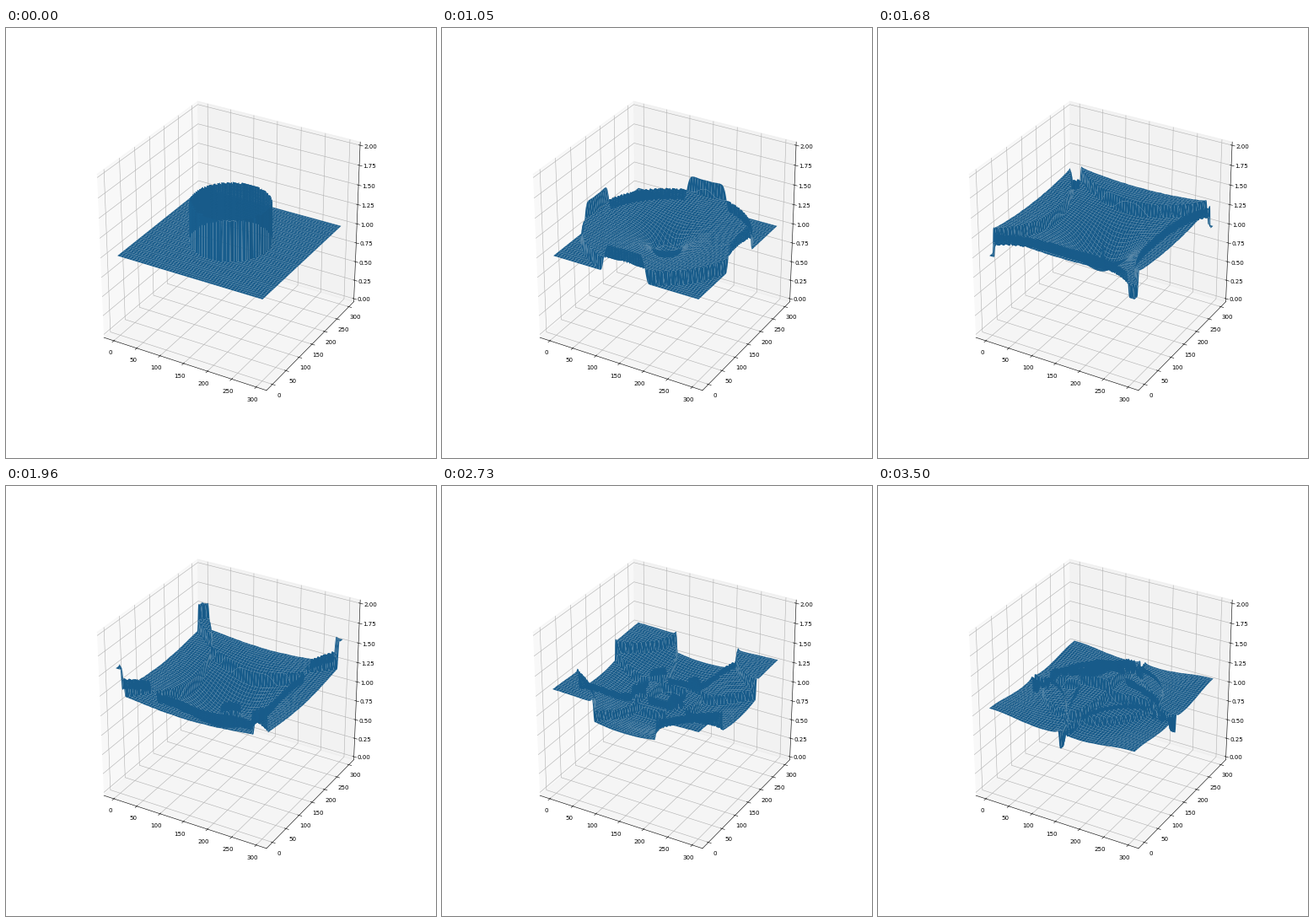
Animation of 510 by 510 pixels, one loop 3570 ms. Source, as a matplotlib script:

```python
import numpy as np
import matplotlib.pyplot as plt
from matplotlib.animation import FuncAnimation
from mpl_toolkits.mplot3d.art3d import Poly3DCollection

SIZE = 300            # grid cells per side
HALF = SIZE // 2
RADIUS = 75           # raised disc at the start
FRAMES = 51
INTERVAL = 70
G = 9.81
DT = 0.1
STEPS = 15            # solver steps per frame
CELL = 6              # grid cells per surface patch
MIRROR = np.array([1, -1, 1], dtype=np.float32)[:, None, None]


def flux(w):
    h, m, s = w
    u = m / h
    return np.stack([m, m * u + 0.5 * G * h * h, s * u])


def wave_speed(w):
    return np.abs(w[1] / w[0]) + np.sqrt(G * w[0])


def limited_slope(w):
    d = np.diff(w, axis=1)
    a, b = d[:, :-1], d[:, 1:]
    size = np.minimum(2 * np.minimum(np.abs(a), np.abs(b)),
                      0.5 * np.abs(a + b))
    return 0.5 * (np.sign(a) + np.sign(b)) * size


def sweep(w):
    """One MUSCL-Hancock step along axis 1 between reflecting walls."""
    w = np.concatenate([w[:, 1::-1] * MIRROR, w, w[:, :-3:-1] * MIRROR],
                       axis=1)
    half = 0.5 * limited_slope(w)
    w = w[:, 1:-1]
    low, high = w - half, w + half
    change = 0.5 * DT * (flux(low) - flux(high))
    left, right = (high + change)[:, :-1], (low + change)[:, 1:]
    speed = np.maximum(wave_speed(left), wave_speed(right))
    f = 0.5 * (flux(left) + flux(right) - speed * (right - left))
    w = w[:, 1:-1] - DT * np.diff(f, axis=1)
    w[0] = np.maximum(w[0], 0.02)
    return w


def turn(w):
    """Swap the two horizontal directions."""
    return np.ascontiguousarray(w[[0, 2, 1]].transpose(0, 2, 1))


def simulate():
    """Shallow water in one quadrant; the others follow by symmetry."""
    d = HALF - 0.5 - np.arange(HALF)
    w = np.zeros((3, HALF, HALF), dtype=np.float32)
    w[0] = np.where(np.hypot(d[:, None], d) <= RADIUS, 1.5, 1.0)
    depths = [w[0].copy()]
    for _ in range(FRAMES - 1):
        for _ in range(STEPS):
            w = turn(sweep(turn(sweep(w))))
        depths.append(w[0].copy())
    return depths


def unfold(q):
    top = np.hstack([q, q[:, ::-1]])
    return np.vstack([top, top[::-1]])


def patch_outlines():
    """Column and row indices around the edge of every patch."""
    k = np.arange(CELL)
    dx = np.r_[k, k * 0 + CELL, CELL - k, k * 0]
    dy = np.r_[k * 0, k, k * 0 + CELL, CELL - k]
    start = np.arange(0, SIZE, CELL)
    cols, rows = np.broadcast_arrays(start[None, :, None] + dx,
                                     start[:, None, None] + dy)
    shape = (-1, 4 * CELL)
    return (np.minimum(cols, SIZE - 1).reshape(shape),
            np.minimum(rows, SIZE - 1).reshape(shape))


def padded(low, high, share):
    pad = (high - low) * share
    return low - pad, high + pad


depths = simulate()
cols, rows = patch_outlines()

fig = plt.figure(figsize=(10, 10), dpi=51)
ax = fig.add_subplot(projection="3d")
ax.apply_aspect = lambda position=None: None   # fill the whole subplot area
ax.view_init(30, -60)
# zoom that makes the padded box 25/24 units wide
ax.set_box_aspect((1, 1, 1), zoom=np.sqrt(3) / 1.8294640721620434)
side = padded(*padded(0, SIZE - 1, 1 / 20), 1 / 48)
ax.set(xlim=side, ylim=side, zlim=padded(0, 2, 1 / 48))
ax.set_xticks(np.arange(0, 301, 50))
ax.set_yticks(np.arange(0, 301, 50))
ax.set_zticks(np.arange(0, 2.01, 0.25))


def draw(i):
    for old in list(ax.collections):
        old.remove()
    z = unfold(depths[i])[rows, cols]
    verts = np.stack([cols, rows, z], axis=-1).astype(float)
    ax.add_collection3d(Poly3DCollection(verts, facecolors="#1f77b4",
                                         shade=True, linewidth=0))
    return []


anim = FuncAnimation(fig, draw, frames=FRAMES, interval=INTERVAL, repeat=True)
plt.show()
```
